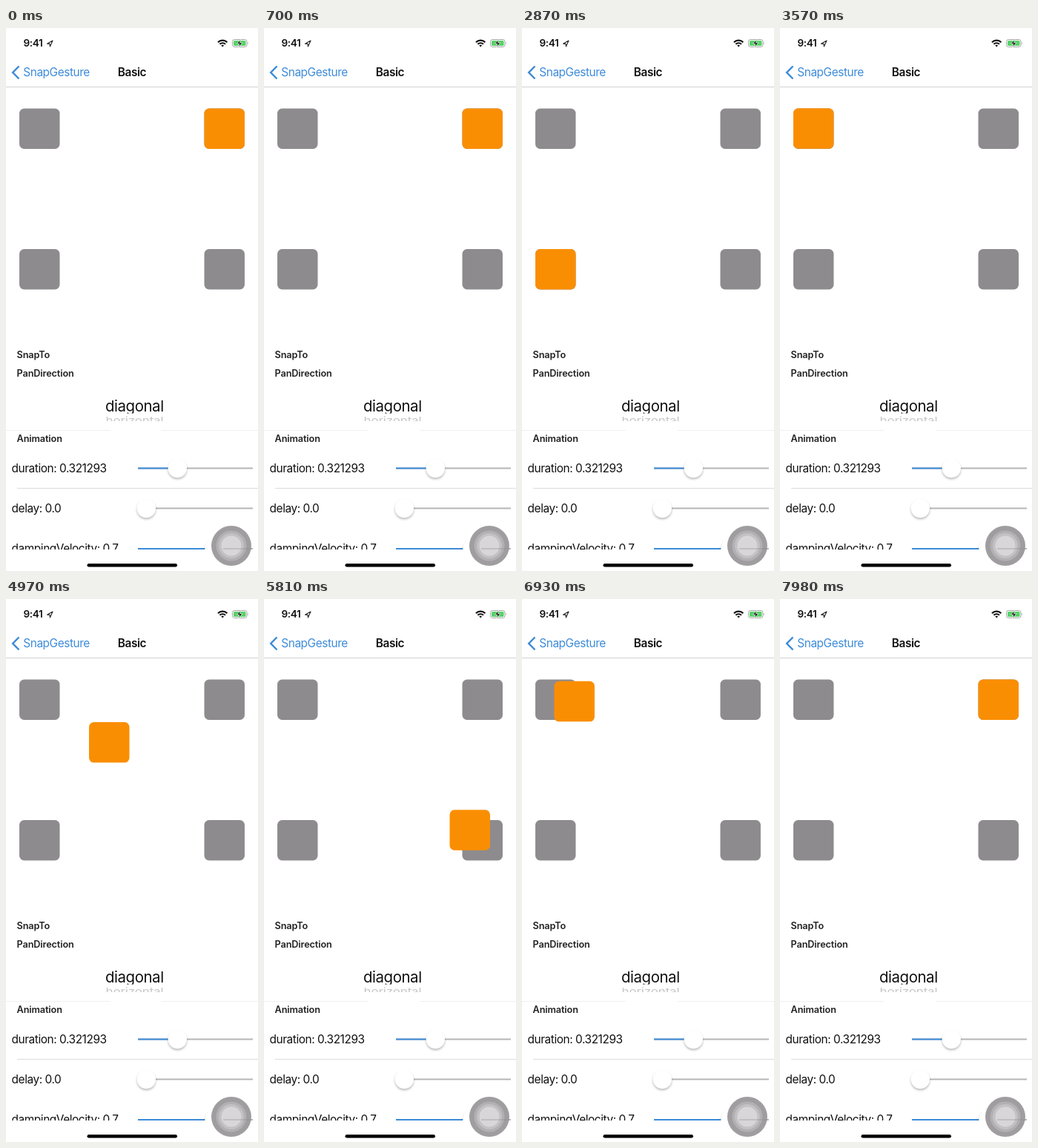
Recreate the animation shown at these times as an HTML page. Size 340x732 px, loop 8000 ms.

```html
<!DOCTYPE html>
<html lang="en">
<head>
<meta charset="utf-8">
<title>Snap gesture</title>
<style>
  html, body { margin: 0; width: 100%; height: 100%; overflow: hidden; background: #fff; }
  svg { display: block; width: 340px; height: 732px; }
  text { font: 15.4px Inter, Roboto, sans-serif; letter-spacing: -.028em; fill: #111; }
  .head { font-size: 12.7px; font-weight: 600; letter-spacing: -.01em; fill: #222; }
  .bold { font-weight: 600; }
  .blue { fill: #3d8bd8; }
  .line { stroke: #b6b6b8; stroke-width: 2; }
  .fill { stroke: #3d8bd8; stroke-width: 2; }
  .thumb { fill: #fff; filter: drop-shadow(0 2px 1.5px #0004); }
  .rule { stroke: #dcdcde; }
</style>
</head>
<body>
<svg viewBox="0 0 340 732">
  <defs>
    <clipPath id="wheel"><path d="M100 490h140v29.5h-140zM100 522h140v8h-140z"/></clipPath>
    <clipPath id="list"><path d="M0 543h340v160H0z"/></clipPath>
    <rect id="box" width="54.5" height="54.5" rx="6.5"/>
  </defs>

  <!-- status bar -->
  <text class="bold" x="23.5" y="25" style="font-size:13.6px">9:41</text>
  <path d="M55.5 21.2 63 17l-3.6 8-.4-3.6z" fill="none" stroke="#222" stroke-width="1.1" stroke-linejoin="round"/>
  <g fill="none" stroke="#111" stroke-width="2.1">
    <path d="M286 19.2a8.8 8.8 0 0 1 12.4 0M288.4 21.8a5.4 5.4 0 0 1 7.6 0"/>
    <path d="M292.2 25.6l-1.9-2a2.7 2.7 0 0 1 3.8 0z" fill="#111" stroke="none"/>
  </g>
  <rect x="305.5" y="15.5" width="19.5" height="10" rx="2.8" fill="none" stroke="#a5a5a5"/>
  <rect x="307" y="17" width="16.5" height="7" rx="1.5" fill="#55d266"/>
  <path d="M326.3 18.8q1.8 1.7 0 3.4z" fill="#a5a5a5"/>
  <path d="M316.5 15.5l-5 5.8h3.3l-1 4.5 5.2-6h-3.4z" fill="#111" stroke="#fff" stroke-width=".7"/>

  <!-- navigation bar -->
  <path d="M17.5 51.5 9.2 60l8.3 8.5" fill="none" stroke="#3d8bd8" stroke-width="2.5"/>
  <text class="blue" x="23.3" y="65.3">SnapGesture</text>
  <text class="bold" x="170" y="65.3" text-anchor="middle">Basic</text>
  <path class="rule" d="M0 79.5h340" style="stroke:#d2d2d2"/>

  <g id="corners" fill="#8e8b8f"></g>
  <use id="mover" href="#box" fill="#fa8e02"/>

  <!-- settings -->
  <text class="head" x="14.6" y="444.5">SnapTo</text>
  <text class="head" x="14.6" y="469.5">PanDirection</text>
  <g clip-path="url(#wheel)" text-anchor="middle">
    <text x="173.3" y="516.7" style="font-size:20.4px;letter-spacing:-.02em">diagonal</text>
    <text transform="translate(173.5 534) scale(1 .8)" style="font-size:17px;letter-spacing:-.01em;fill:#c6c6c6">horizontal</text>
  </g>
  <path d="M0 542.5h140M210 542.5h130" stroke="#f0f0f0"/>
  <text class="head" x="14.6" y="558.3">Animation</text>
  <path class="rule" d="M15 620.5h325"/>
  <g id="rows" clip-path="url(#list)"></g>

  <!-- floating button -->
  <circle cx="304" cy="698" r="27" fill="#a09da0"/>
  <circle cx="304" cy="698" r="20.5" fill="#b3b0b3"/>
  <circle cx="304" cy="698" r="17" fill="#c3c1c3"/>
  <circle cx="304" cy="698" r="13.5" fill="#d8d6d8"/>
  <path d="M293 702h38" stroke="#8a878a" stroke-opacity=".4" stroke-width="1.6"/>
  <rect x="109.5" y="722" width="121.5" height="4.6" rx="2.3" fill="#000"/>
</svg>
<script>
const LOOP = 8000, STEP = 70;
const LEFT = 18, RIGHT = 267.5, TOP = 108.5, BOTTOM = 298;
const byId = id => document.getElementById(id);

byId('corners').innerHTML = [LEFT, RIGHT].flatMap(x => [TOP, BOTTOM].map(y =>
  `<use href="#box" x="${x}" y="${y}"/>`)).join('');

const row = (label, y, knob) => `
  <text x="7.6" y="${y + 5}">${label}</text>
  <path class="line" d="M178 ${y}H333"/>
  <path class="fill" d="M178 ${y}H${knob}"/>
  <circle class="thumb" cx="${knob}" cy="${y}" r="12.7"/>`;
byId('rows').innerHTML =
  row('duration: 0.321293', 593.5, 231.3) +
  row('delay: 0.0', 647.5, 189.3) +
  row('dampingVelocity: 0.7', 702, 281);

// drag start, release time, release point, snap corner
const moves = [
  [700, 1080, [245, 205], [RIGHT, BOTTOM]],
  [1700, 2100, [155, 290], [LEFT, BOTTOM]],
  [3000, 3290, [24, 215], [LEFT, TOP]],
  [4620, 5140, [225.5, 235.5], [RIGHT, BOTTOM]],
  [5690, 5985, [165, 215], [LEFT, TOP]],
  [6760, 7140, [145, 120], [RIGHT, TOP]],
];

const mix = (a, b, p) => a.map((v, i) => v + (b[i] - v) * p);

// damped spring, ratio 0.7
function spring(ms) {
  const w = 0.026 * ms, d = 0.714 * w;
  return 1 - Math.exp(-0.7 * w) * (Math.cos(d) + 0.98 * Math.sin(d));
}

function position(t) {
  let home = [RIGHT, TOP];
  let pos = home;
  for (const [start, release, point, corner] of moves) {
    if (t < start) break;
    pos = t < release
      ? mix(home, point, ((t - start) / (release - start)) ** 2)
      : mix(point, corner, spring(t - release));
    home = corner;
  }
  return pos;
}

const mover = byId('mover');
const origin = performance.now();
function draw() {
  const t = (performance.now() - origin) % LOOP;
  const [x, y] = position(Math.floor(t / STEP) * STEP);
  mover.setAttribute('transform', `translate(${x.toFixed(2)} ${y.toFixed(2)})`);
  requestAnimationFrame(draw);
}
draw();
</script>
</body>
</html>
```
